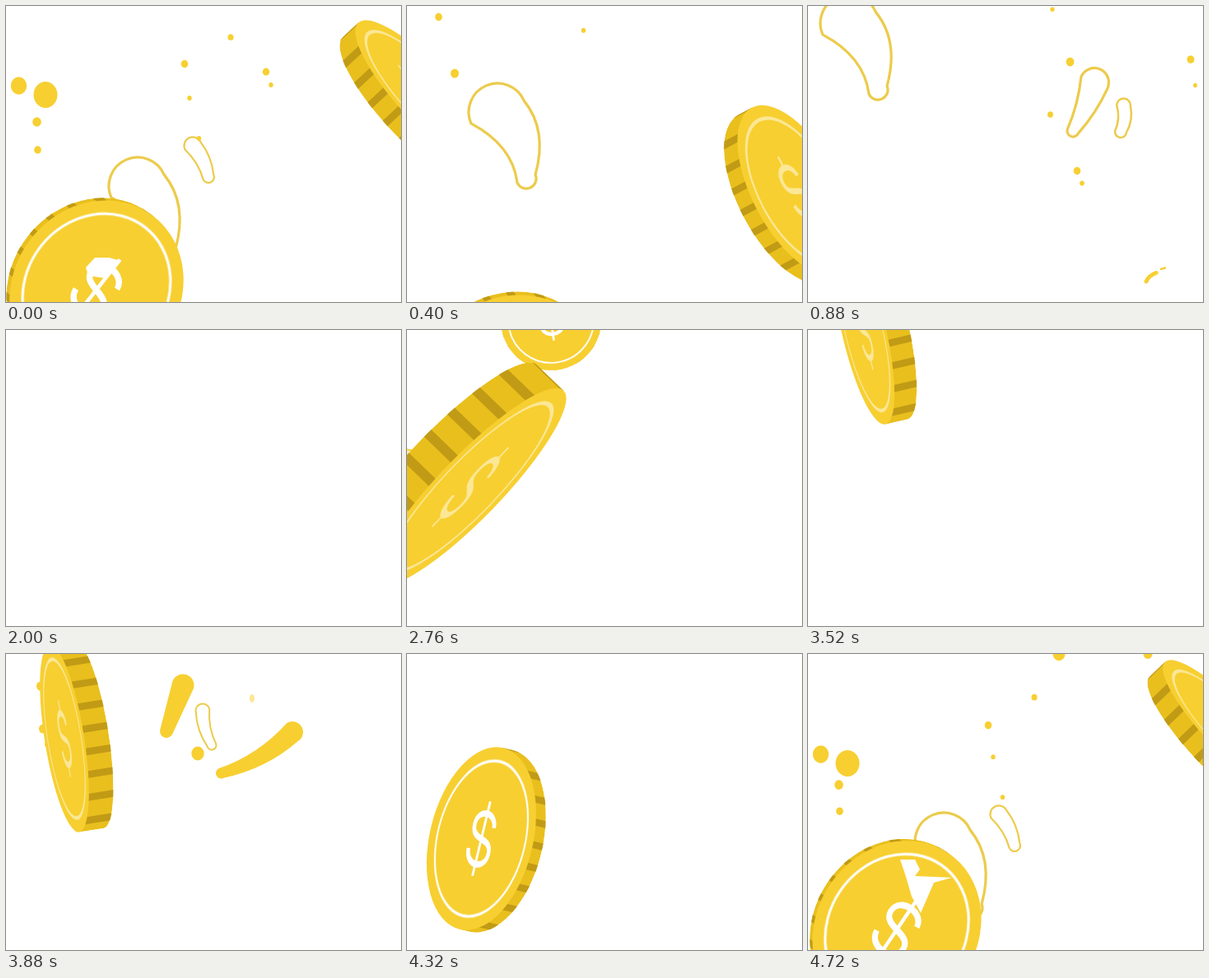
Animation, 480 px wide and 360 px high, one loop 4.76 s. Source, as an HTML page with a canvas:

```html
<!DOCTYPE html>
<html lang="en">
<head>
<meta charset="utf-8">
<title>Falling coins</title>
<style>
html, body { margin: 0; height: 100%; overflow: hidden; background: #fff; }
canvas { display: block; }
</style>
</head>
<body>
<canvas id="stage" width="480" height="360"></canvas>
<script>
const LOOP = 4760, STEP = 40, FIRST = 2400, LAST = 6760;
const GOLD = '#f7cf31', RIM = '#e9bf1e', STRIPE = '#c19b15', CREAM = '#fbe795', LINE = '#eccb4c';
const g = document.getElementById('stage').getContext('2d');
let now = 0;

const sign = new Path2D('M.19-.14C.17-.32-.2-.32-.19-.13S.2-.05.2.14S-.18.33-.2.13');
const bar = new Path2D('M0-.41V.41');
const barEnds = new Path2D('M0-.41V-.27M0 .27V.41');

function stroke(path, color, width) {
  g.strokeStyle = color;
  g.lineWidth = width;
  g.stroke(path);
}

function fill(path, color) {
  g.fillStyle = color;
  g.fill(path);
}

function ellipse(x, y, rx, ry) {
  const p = new Path2D();
  p.ellipse(x, y, rx, ry, 0, 0, 7);
  return p;
}

// Each pose: time, x, y, half height, half width, angle of the sign's top, rim depth
function coin(...poses) {
  const i = poses.findIndex(p => p[0] > now);
  if (i < 1) return null;
  const from = poses[i - 1], to = poses[i], u = (now - from[0]) / (to[0] - from[0]);
  const [, x, y, a, b, angle, depth] = from.map((v, j) => v + (to[j] - v) * u);
  const broad = b > a / 2, ink = broad ? '#fff' : CREAM;
  g.save();
  g.translate(x, y);
  g.rotate(angle * Math.PI / 180);

  g.save();
  const rim = ellipse(0, -depth, a, b);
  rim.rect(-a, Math.min(0, -depth), 2 * a, Math.abs(depth));
  g.clip(rim);
  fill(rim, RIM);
  g.fillStyle = STRIPE;
  for (let s = -0.93; s < 1; s += 0.24) g.fillRect(s * a, -2 * a, 0.075 * a, 4 * a);
  g.restore();

  g.scale(a, b);
  g.rotate(Math.PI / 2);
  fill(ellipse(0, 0, 1, 1), GOLD);
  const ring = ellipse(0, 0, 0.85, 0.85);
  stroke(ring, CREAM, 0.04);
  if (broad) stroke(ring, '#fff', 0.022);
  stroke(sign, ink, 0.07);
  stroke(broad ? bar : barEnds, ink, 0.045);
  g.restore();
  return { x, y };
}

// White gap in a coin, relative to its centre
function gap(at, outline, size = 1) {
  if (!at) return;
  g.save();
  g.translate(at.x, at.y);
  g.scale(size, size);
  fill(new Path2D(outline), '#fff');
  g.restore();
}

// Confetti that pops up `lead` steps before `time` and rises, big pieces faster
function burst(time, lead, dots, beans = []) {
  const s = (now - time) / STEP;
  if (s < -lead) return;
  for (const bean of beans) drawBean(s, ...bean);
  for (const [x, y, r] of dots) {
    const rise = Math.min(25, 8 + 1.9 * r), drift = x < 100 ? 0 : -2;
    fill(ellipse(x + drift * s, y - rise * s, r, r * 1.1), GOLD);
  }
}

// Tapered, bent capsule between two round ends; filled when width is 0
function drawBean(s, x1, y1, r1, x2, y2, r2, bend, width) {
  const len = Math.hypot(x2 - x1, y2 - y1), mid = (r1 + r2) / 2, q = Math.PI / 2;
  g.save();
  g.translate(x1 - 5 * s, y1 - (r1 > 30 ? 9 : 25) * s);
  g.rotate(Math.atan2(y2 - y1, x2 - x1));
  const p = new Path2D();
  p.arc(0, 0, r1, q, 3 * q);
  p.quadraticCurveTo(len / 2, bend - mid, len, -r2);
  p.arc(len, 0, r2, -q, q);
  p.quadraticCurveTo(len / 2, bend + mid, 0, r1);
  p.closePath();
  if (width) stroke(p, LINE, width);
  else fill(p, GOLD);
  g.restore();
}

function drawConfetti() {
  if (now < 2960) {
    const disc = ellipse(-5, 172 - (now - 2760) / 5, 31, 27);
    fill(disc, '#fbeeb8');
    stroke(disc, GOLD, 2);
  }
  burst(3160, 8, [[51, 47, 14.5], [20, 99, 10], [56, 129, 4], [69, 157, 5.3]],
    [[-2, 75, 13, -12, 115, 7, -5, 2]]);

  burst(3880, 5, [[42, 39, 5], [45, 91, 5], [50, 110, 3], [233, 121, 7.7]], [
    [215, 38, 13.5, 195, 94, 8, 0, 0],
    [348, 95, 13, 261.5, 145, 6.5, -13, 0],
    [239, 69, 8.5, 250, 111, 5.5, 6, 2]]);
  if (Math.abs(now - 3880) < 200) fill(ellipse(299, 54 - (now - 3880) / 3, 3, 5), CREAM);

  burst(4720, 8, [[305, 0, 7.5], [413, 0, 5.5]]);
  burst(4760, 8, [[15.5, 97, 9.7], [48, 108, 14.5], [37.5, 141, 5.3], [38.5, 175, 4.3],
    [273, 38, 3.5], [217, 70.5, 4.3], [223, 112, 2.7], [234.5, 161, 2.7]], [
    [160, 219, 35, 195, 300, 12, -24, 3.2],
    [227, 170, 10.5, 246, 208, 7, -6, 2.2]]);
  burst(4760, 0, [[316, 80, 4.2], [322, 96, 2.7], [58, 257, 5]]);

  burst(5640, 8, [[318.5, 68, 4.9], [465, 65, 4.4], [470.5, 96.5, 2.4], [294.5, 132, 3.4],
    [327, 200.5, 4.3], [333, 215.5, 2.8], [297, 4, 2.6]], [
    [348, 93, 17.5, 322, 152, 7, -5, 3.2],
    [383.5, 121, 8.5, 380, 153, 7, -6, 2.5]]);
  burst(5960, 0, [[240, 285, 4]]);
  burst(6480, 4, [], [[262, 150, 11, 275, 203, 6, -6, 2.2]]);
}

function drawCoins() {
  const far = coin(
    [2400, 155, -75, 61, 61, -95, 0], [2760, 175, -12, 61, 61, -98, 0],
    [3160, 218, 49, 58, 48, -60, -5], [3480, 240, 110, 56, 36, -45, -10]);
  if (now > 3040) {
    gap(far, 'M-18-1L-6-21Q6-31 20-15L31 1L28 19L12 15H-4L-12 20L-20 9Z',
      Math.max(0.3, 1 + (now - 3160) / 400));
  }

  const left = coin(
    [3080, 65, -120, 115, 30, -108, -25], [3880, 71, 103, 115, 24, -99, -30],
    [4720, 108, 335, 112, 98, -56, 4], [4760, 110, 345, 113, 101, -52, 5],
    [5280, 130, 490, 113, 101, -30, 5]);
  if (now >= 4760) gap(left, 'M-13-27L-2-39H15L30-35L10-14L-10-17Z');
  else if (now >= 4640) gap(left, 'M4-85H22L28-73L22-65L67-63L45-57L29-20L18-40L11-64Z');

  coin(
    [4360, 570, -20, 120, 24, -138, 26], [4720, 517, 96, 120, 29, -134, 26],
    [4760, 510, 108, 120, 34, -133, 26], [5520, 440, 330, 110, 70, -105, 12]);
  // Last sliver of the right-hand coin
  if (now >= 5520 && now < 5760) {
    g.save();
    g.translate(0, (now - 5640) / 4);
    g.lineCap = 'round';
    stroke(new Path2D('M411 335Q414 328 423 324.5'), GOLD, 5);
    stroke(new Path2D('M429 320L434 318.5'), GOLD, 2.5);
    g.restore();
  }

  coin(
    [2400, 60, -150, 155, 22, -62, 45], [2760, 77, 191, 163, 38, -46, 45],
    [3160, 200, 382, 163, 137, -16, -3], [3440, 215, 560, 163, 150, 5, -10]);
}

function tick() {
  const t = Math.floor(performance.now() % LOOP / STEP) * STEP;
  now = t < FIRST ? t + LOOP : t;
  g.clearRect(0, 0, 480, 360);
  if (now >= 2440 && now < LAST) {
    drawConfetti();
    drawCoins();
  }
  requestAnimationFrame(tick);
}
tick();
</script>
</body>
</html>
```
